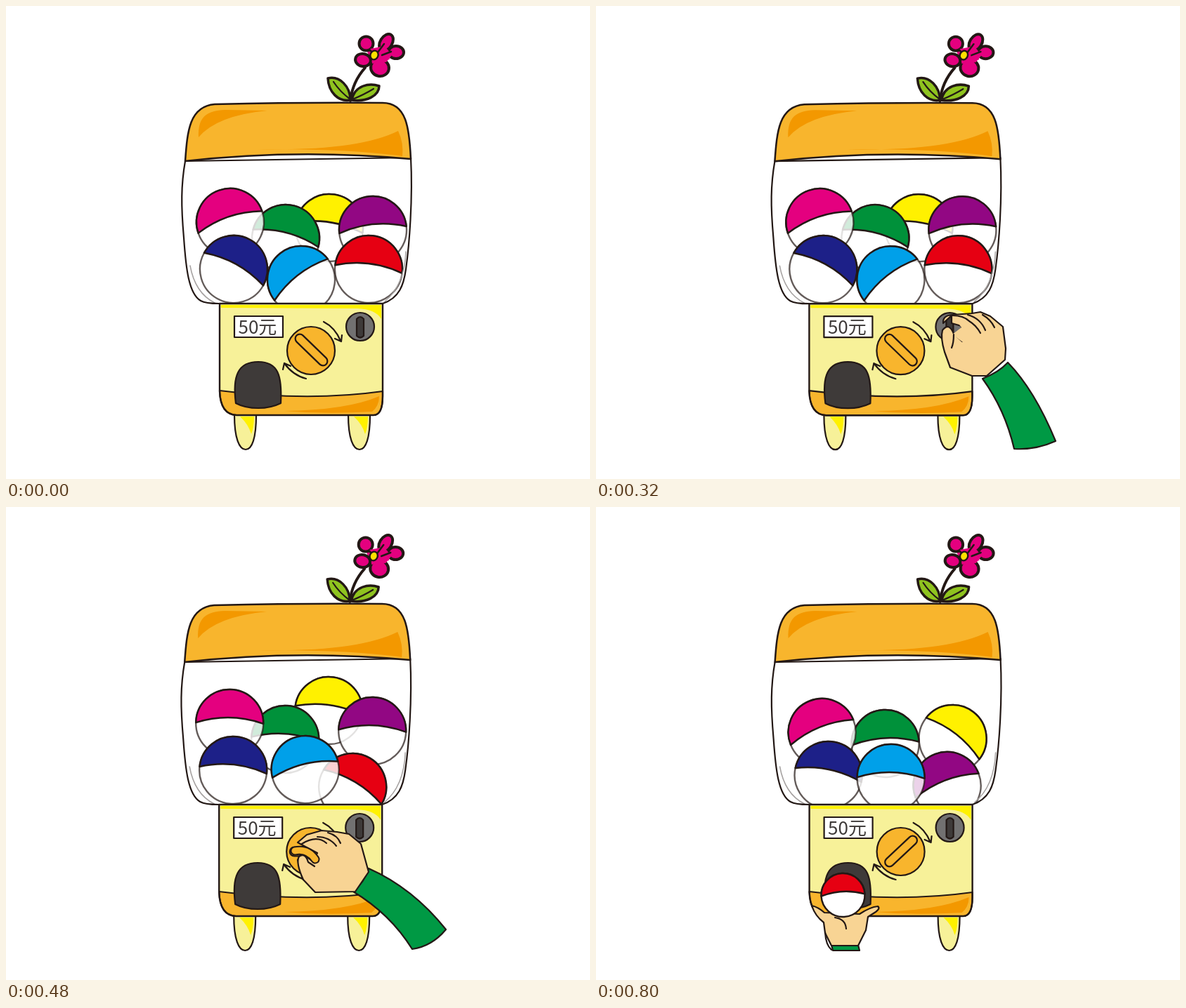
An HTML page with a canvas for the animation above (960 ms loop, 831 px wide and 674 px high).

```html
<!DOCTYPE html>
<html lang="zh-Hant">
<head>
<meta charset="utf-8">
<title>Capsule machine</title>
<style>
html, body { margin: 0; width: 100%; height: 100%; overflow: hidden; background: #fff; }
canvas { display: block; }
</style>
</head>
<body>
<canvas id="stage" width="831" height="674"></canvas>
<script>
const ctx = document.getElementById('stage').getContext('2d');
const INK = '#231815', DARK = '#3e3a39', ORANGE = '#f8b52d', DEEP = '#f39800';
const CREAM = '#f7f199', YELLOW = '#fff100', SKIN = '#f8d494', GREEN = '#009944', LEAF = '#8fc31f';
const PINK = '#e4007f', EMERALD = '#00913a', PURPLE = '#920783', NAVY = '#1d2088', SKY = '#00a0e9', RED = '#e60012';
const STEP = 160;

function paint(path, fill, stroke = INK, width = 2.2) {
  if (fill) { ctx.fillStyle = fill; ctx.fill(path); }
  if (stroke) { ctx.strokeStyle = stroke; ctx.lineWidth = width; ctx.stroke(path); }
}
const shape = (d, ...style) => paint(new Path2D(d), ...style);
const line = (d, width = 2.2, color = INK) => shape(d, null, color, width);
function oval(x, y, rx, ry, tilt, ...style) {
  const path = new Path2D();
  path.ellipse(x, y, rx, ry, tilt, 0, 7);
  paint(path, ...style);
}

function ball([color, x, y, tilt], r = 48, glass = 'rgba(255,255,255,.82)', rim = 'rgba(35,24,21,.7)') {
  ctx.save();
  ctx.translate(x, y);
  ctx.rotate(tilt * Math.PI / 180);
  oval(0, 0, r, r, 0, glass, rim, 2.4);
  shape(`M${-r},0A${r},${r} 0 0 1 ${r},0Q0,${-r * .33} ${-r},0Z`, color, INK, 2.5);
  ctx.restore();
}

// Each pile is listed from back to front: colour, centre, tilt in degrees.
const resting = [
  [YELLOW, 460, 316, 9], [EMERALD, 398, 331, 15], [PINK, 319, 308, -19], [PURPLE, 522, 319, -6],
  [NAVY, 324, 375, 29], [RED, 516, 375, 7], [SKY, 420, 390, -38]
];
const turning = [
  [YELLOW, 460, 290, 8], [EMERALD, 398, 331, 4], [PINK, 319, 308, 1], [PURPLE, 522, 319, 2],
  [NAVY, 324, 375, 6], [RED, 494, 399, 31], [SKY, 426.5, 374, -14]
];
const dropping = [
  [YELLOW, 474, 305, 25], [EMERALD, 398, 331, -1], [PINK, 318, 307, -13], [PURPLE, 517, 371, -7],
  [NAVY, 330, 382, -6], [RED, 454, 432, 3], [SKY, 427, 374, -9]
];
const settled = [
  [YELLOW, 508, 330, 38], [EMERALD, 412, 337, -3], [PINK, 322, 321, -22], [PURPLE, 500, 397, -21],
  [NAVY, 331, 382, 12], [SKY, 420, 386, 1]
];

function flower() {
  line('M490,135Q493,108 511,88', 4);
  shape('M490,134C473,137 459,123 458,103C475,99 490,115 490,134Z', LEAF, INK, 3.5);
  shape('M492,134C496,113 517,109 531,114C531,128 513,137 492,134Z', LEAF, INK, 3.5);
  line('M490,133Q475,122 466,108M493,133Q510,126 523,118');
  shape('M513,62L542,60L546,76L520,82Z', PINK, null);
  for (const [x, y, rx, ry, tilt] of [
    [555, 66, 11, 9, 0], [541, 52, 8.5, 13, .55], [512.5, 53.5, 10, 10, 0],
    [532, 88, 13, 12, .2], [508, 77, 11, 9, .2]
  ]) oval(x, y, rx, ry, tilt, PINK, INK, 4);
  shape('M518,61L539,57L549,70L541,80L521,82Z', PINK, null);
  line('M529,66L538,54M535,70L548,65M517,62L521,66M520,76L517,83', 2.5);
  oval(524, 70, 5.5, 6.5, .4, '#ffe100', INK, 2.4);
}

function globe(balls) {
  const glass = new Path2D('M255,221C249,255 249,285 253,330C256,374 260,410 277,420Q284,424 303,424L536,424C560,416 566,397 569,375C574,340 579,275 576,216Z');
  paint(glass, '#fff', null);
  ctx.save();
  ctx.clip(glass);
  for (const item of balls) ball(item);
  line('M262,370Q269,409 297,423M569,350Q567,398 539,421', 1.5, '#a5a1a0');
  ctx.restore();
  paint(glass, null, INK, 2.2);
  shape('M255,221C258,178 261,143 297,140Q420,137 536,138C570,138 574,174 576,218Q415,203 255,221Z', ORANGE, INK, 2.5);
  shape('M274,187C273,158 285,149 312,148L372,149Q300,156 274,187Z', DEEP, null);
  shape('M358,204Q500,207 558,178Q566,195 564,214Q490,203 358,204Z', DEEP, null);
}

function leg(x) {
  shape(`M${x},583h31c0,33 -6,49 -15,49s-16,-16 -16,-49Z`, CREAM);
  shape(`M${x + 8},585h20q0,15 -4,25q-4,-14 -16,-25Z`, YELLOW, null);
}

function cabinet(slot) {
  shape('M304,424H536V556Q536,583 523,583H328Q305,582 304,549Z', CREAM, null);
  shape('M306,426H534V446Q526,432 500,431L306,430Z', YELLOW, null);
  shape('M304,548Q430,564 536,549V556Q536,583 523,583H328Q305,582 304,548Z', ORANGE);
  shape('M395,577Q485,576 531,556Q531,570 521,578Q455,582 395,577Z', DEEP, null);
  line('M304,424H536V556Q536,583 523,583H328Q305,582 304,549Z', 2.4);

  shape('M325,442H394V472H325Z', '#fff');
  ctx.fillStyle = DARK;
  ctx.font = '500 26px "Noto Sans CJK TC", "Noto Sans CJK SC", "Noto Sans CJK JP", sans-serif';
  ctx.fillText('50元', 330.5, 467);

  oval(504, 457, 20, 20, 0, '#727171');
  shape('M499,446Q504,440 509,446V470Q504,475 499,470Z', DARK);
  line('M452,450Q468,458 476,477M468,474L477,478L478,469');
  line('M427,531Q408,526 396,509M394,518L396,509L405,513');
  oval(434, 491, 34, 34, 0, ORANGE);
  line(slot, 15);
  line(slot, 10.5, ORANGE);
  shape('M327,566C322,527 330,507 359,507C387,507 393,526 391,566Q377,573 359,573Q340,573 327,566Z', DARK);
}

function insertCoin() {
  shape('M568,530Q599,571 612,631Q641,633 670,620Q641,547 605,510Q592,522 568,530Z', GREEN);
  shape('M525,442L546,440L562,436L577,440L598,454L603,488L601,512L577,528L551,526L524,518L516,490L531,468Z', SKIN);
  oval(521, 466, 15.5, 15.5, 0, null, INK, 10);
  oval(521, 466, 15.5, 15.5, 0, null, YELLOW, 6);
  shape('M519,501Q509,471 514,461Q527,450 531,466L526,487', SKIN);
}

function pushCoin() {
  shape('M550,531Q582,575 595,631Q625,633 654,620Q624,547 586,508Q573,522 550,531Z', GREEN);
  shape('M494,452Q493,441 507,440L535,438L547,436L561,442L579,457L583,488L582,504L556,527L535,527L504,515L496,493Q490,473 493,462Q502,450 509,467L521,478L520,456L506,452L506,441Z', SKIN);
  shape('M508,442L528,440L540,460L522,479L507,468L520,458Z', SKIN, null);
  line('M507,441Q523,441 531,449Q541,455 547,466M529,440Q547,445 554,462M550,440Q562,447 567,458M509,468Q509,480 506,487');
}

function gripKnob() {
  shape('M516,515Q579,543 626,602Q606,626 578,630Q547,580 494,548Q510,535 516,515Z', GREEN);
  shape('M415,478L428,467L449,461L471,463L488,466L505,480L516,520L497,548L440,549L422,530L415,503L420,493L437,505L443,493L426,484Z', SKIN);
  line('M411,490Q429,486 440,502', 13);
  line('M411,490Q429,486 440,502', 9, ORANGE);
  shape('M423,531Q412,507 417,498Q426,492 430,506L439,512', SKIN);
  line('M421,480Q442,467 456,479M443,470Q460,470 470,483M458,464Q472,468 476,479');
}

function twistKnob() {
  shape('M518,454Q590,478 636,530Q618,552 590,562Q557,522 510,498Q520,480 518,454Z', GREEN);
  shape('M422,481L423,464L434,447L460,433L501,437L517,454L517,485L482,523L448,521L427,506L414,504L415,492L442,488L430,480Z', SKIN);
  line('M418,506Q424,488 443,492', 12);
  line('M418,506Q424,488 443,492', 8, ORANGE);
  shape('M448,521Q429,514 428,500Q437,491 442,501L454,492', SKIN);
  line('M424,465Q434,450 454,447M429,474Q439,460 459,458M432,484Q441,476 452,484Q457,491 452,497');
}

function takeCapsule() {
  shape('M335,624H373L375,632H337Z', GREEN);
  shape('M307,568Q316,570 325,578L375,580Q390,570 401,569Q405,572 398,577L387,584L384,603L373,625H335L326,607L324,592Q312,583 307,568Z', SKIN);
  line('M326,606Q327,624 335,631');
  ball([RED, 351.5, 553, -3], 31, '#fff', INK);
  line('M340,585Q355,587 356,601');
}

const slotDown = 'M418,474L451,506', slotUp = 'M418,506L451,475';
const scenes = [
  { shift: [0, 0], balls: resting, slot: slotDown },
  { shift: [0, .8], balls: resting, slot: slotDown, hand: insertCoin },
  { shift: [-.6, .2], balls: resting, slot: slotDown, hand: pushCoin },
  { shift: [-.8, 0], balls: turning, slot: 'M411,491H457', hand: gripKnob },
  { shift: [.8, -.5], balls: dropping, slot: slotUp, hand: twistKnob },
  { shift: [-.4, 0], balls: settled, slot: slotUp, hand: takeCapsule }
];

function draw() {
  const { shift, balls, slot, hand } = scenes[Math.floor(performance.now() / STEP) % scenes.length];
  ctx.setTransform(1, 0, 0, 1, 0, 0);
  ctx.fillStyle = '#fff';
  ctx.fillRect(0, 0, 831, 674);
  ctx.lineJoin = ctx.lineCap = 'round';
  ctx.save();
  ctx.translate(...shift);
  flower();
  globe(balls);
  if (hand !== takeCapsule) leg(325);
  leg(487);
  cabinet(slot);
  ctx.restore();
  if (hand) hand();
  requestAnimationFrame(draw);
}
draw();
</script>
</body>
</html>
```
